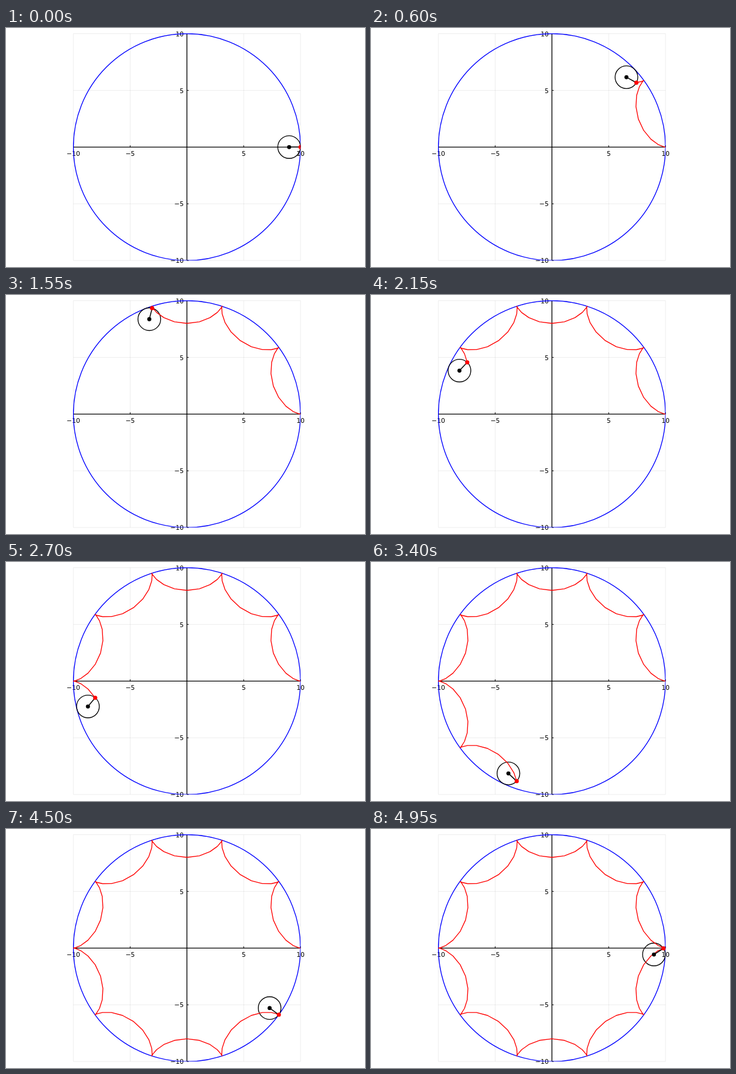
An HTML page that plays this animation: 600 px wide and 400 px high, repeating every 5 s.

```html
<!DOCTYPE html>
<html lang="en">
<head>
<meta charset="utf-8">
<title>Hypocycloid</title>
<style>
  html, body { margin: 0; width: 100%; height: 100%; overflow: hidden; background: #fff; }
  svg { display: block; }
  text { font: 10.67px "DejaVu Sans", sans-serif; }
  .line { fill: none; stroke: #000; stroke-width: 1.35; stroke-linejoin: round; }
</style>
</head>
<body>
<svg width="600" height="400" viewBox="0 0 600 400">
  <clipPath id="plot"><rect x="112" y="9" width="380.4" height="380.3"/></clipPath>
  <g id="axes"></g>
  <g clip-path="url(#plot)">
    <circle id="outer" class="line" style="stroke:#00f"/>
    <circle id="wheel" class="line"/>
    <path id="trail" class="line" style="stroke:#f00"/>
    <path id="arm" class="line" style="stroke-width:1.5"/>
    <circle id="hub" r="3.4"/>
    <circle id="pen" r="3.5" fill="#f00"/>
  </g>
</svg>
<script>
const CX = 302.4, CY = 199.3, UNIT = 18.98;
const R = 10, r = 1, STEPS = 100, STEP_MS = 50;
const $ = id => document.getElementById(id);
const px = x => CX + x * UNIT;
const py = y => CY - y * UNIT;

function add(name, attrs, text) {
  const el = document.createElementNS("http://www.w3.org/2000/svg", name);
  set(el, attrs);
  if (text) el.textContent = text;
  $("axes").append(el);
}
function set(el, attrs) {
  for (const key in attrs) el.setAttribute(key, attrs[key]);
}
function line(x1, y1, x2, y2, width, opacity = 1) {
  add("line", { x1, y1, x2, y2, stroke: "#000", "stroke-width": width, "stroke-opacity": opacity });
}

function drawAxes() {
  const ticks = [-10, -5, 5, 10];
  const [left, right, top, bottom] = [px(-R), px(R), py(R), py(-R)];
  for (const v of ticks) {
    line(px(v), top, px(v), bottom, 0.7, 0.1);
    line(left, py(v), right, py(v), 0.7, 0.1);
  }
  line(left, CY, right, CY, 1.35);
  line(CX, top, CX, bottom, 1.35);
  for (const v of ticks) {
    const label = String(v).replace("-", "\u2212");
    line(px(v), CY, px(v), CY - 3, 1);
    line(CX, py(v), CX + 3, py(v), 1);
    add("text", { x: px(v), y: 214, "text-anchor": "middle" }, label);
    add("text", { x: 297, y: py(v) + 4.1, "text-anchor": "end" }, label);
  }
}

const angle = i => 2 * Math.PI * i / STEPS;
function hubAt(i) {
  const a = angle(i);
  return [px((R - r) * Math.cos(a)), py((R - r) * Math.sin(a))];
}
function penAt(i) {
  const [x, y] = hubAt(i), spin = angle(i) * (R - r) / r;
  return [x + r * UNIT * Math.cos(spin), y + r * UNIT * Math.sin(spin)];
}
const points = Array.from({ length: STEPS }, (_, i) => penAt(i));

function draw(step) {
  const [cx, cy] = hubAt(step), pen = points[step];
  set($("wheel"), { cx, cy });
  set($("hub"), { cx, cy });
  set($("pen"), { cx: pen[0], cy: pen[1] });
  set($("arm"), { d: `M${cx},${cy}L${pen}` });
  set($("trail"), { d: "M" + points.slice(0, step + 1).join("L") });
}

let shown = -1;
function tick(now) {
  const step = Math.floor(now / STEP_MS) % STEPS;
  if (step !== shown) draw(shown = step);
  requestAnimationFrame(tick);
}

drawAxes();
set($("outer"), { cx: CX, cy: CY, r: R * UNIT });
set($("wheel"), { r: r * UNIT });
draw(0);
const start = performance.now();
requestAnimationFrame(now => tick(Math.max(0, now - start)));
</script>
</body>
</html>
```
